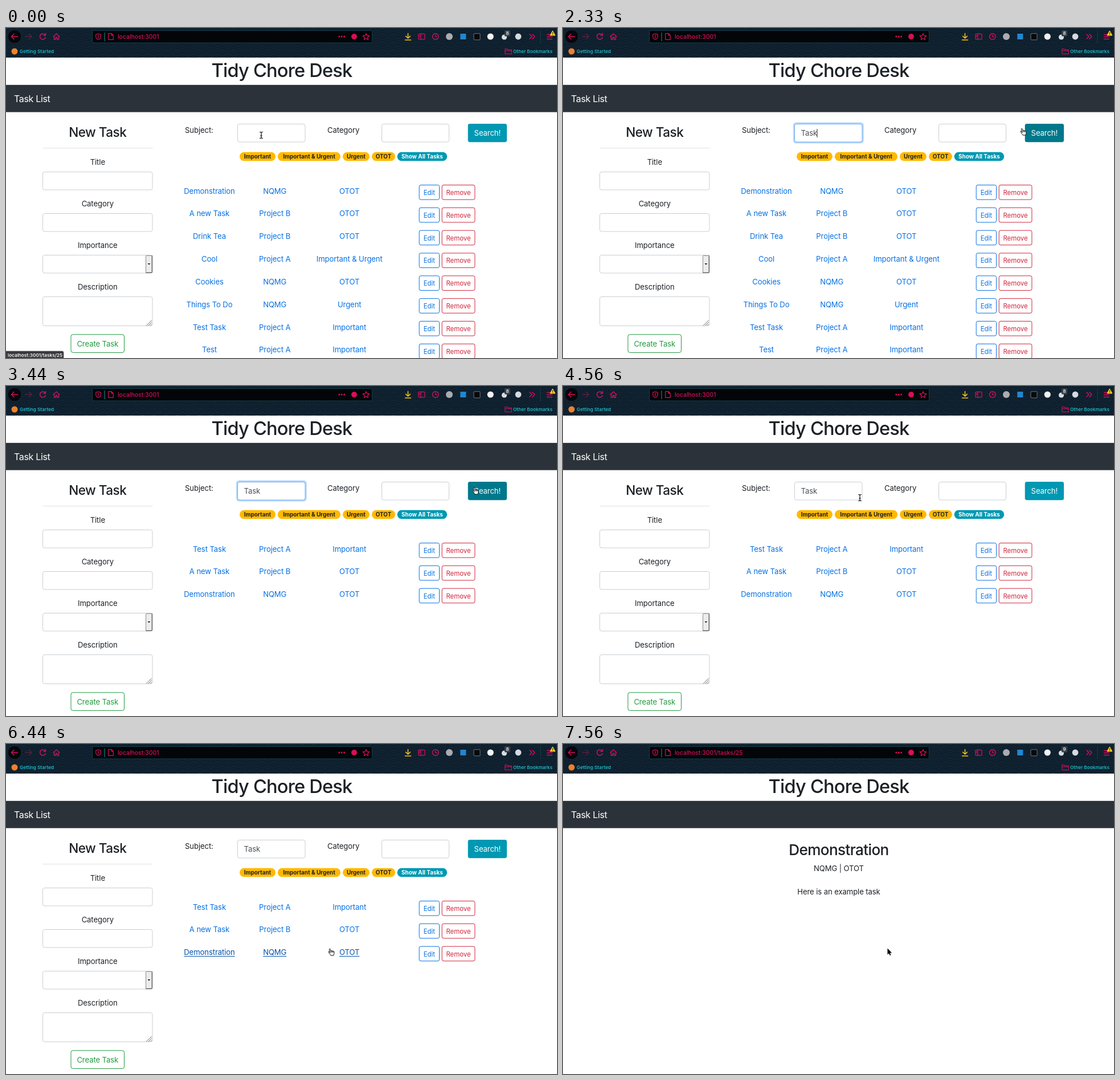
An HTML page with a canvas that plays this animation: 967 px wide and 579 px high, repeating every 8000 ms.

```html
<!DOCTYPE html>
<html lang="en">
<head>
<meta charset="utf-8">
<title>Task List</title>
<style>
html, body { margin: 0; width: 100%; height: 100%; overflow: hidden; background: #fff; }
canvas { display: block; width: 967px; height: 579px; }
</style>
</head>
<body>
<canvas id="stage"></canvas>
<script>
const W = 967, H = 579, LOOP = 8000;
const canvas = document.getElementById('stage');
const ctx = canvas.getContext('2d');
const dpr = window.devicePixelRatio || 1;
canvas.width = W * dpr;
canvas.height = H * dpr;

const INK = '#1d2126', LINK = '#0670e3', LINK_HOVER = '#0050a8', RED = '#d0263c',
  GREEN = '#1f9a3e', TEAL = '#0098b2', TEAL_HOVER = '#00788b', TEAL_PRESS = '#006f80',
  YELLOW = '#ffb900', PINK = '#d60f5c', CYAN = '#1fb5c2', BORDER = '#c9ced3';
const BODY = 13.1, TOOLBAR = 51.6;

const rows = [
  ['Demonstration', 'NQMG', 'OTOT'],
  ['A new Task', 'Project B', 'OTOT'],
  ['Drink Tea', 'Project B', 'OTOT'],
  ['Cool', 'Project A', 'Important & Urgent'],
  ['Cookies', 'NQMG', 'OTOT'],
  ['Things To Do', 'NQMG', 'Urgent'],
  ['Test Task', 'Project A', 'Important'],
  ['Test', 'Project A', 'Important']
];
const found = [rows[6], rows[1], rows[0]];

// Pointer steps: time, shape, x, y
const pointer = [
  [0, 'beam', 448, 188], [890, '', 0, 0], [1440, 'beam', 452, 188],
  [1560, 'beam', 496, 188], [1670, 'arrow', 572, 184], [1780, 'beam', 672, 188],
  [1890, 'beam', 739, 187], [2330, 'hand', 808, 182], [2780, 'hand', 824, 184],
  [4220, 'hand', 700, 222], [4330, 'hand', 578, 218], [4560, 'beam', 521, 196],
  [4780, 'beam', 505, 190], [4890, 'beam', 490, 184], [5000, 'beam', 483, 182],
  [5110, 'arrow', 486, 199], [5440, 'hand', 520, 228], [5560, 'arrow', 600, 255],
  [5670, 'arrow', 672, 306], [5780, 'arrow', 712, 342], [5890, 'hand', 743, 375],
  [6440, 'hand', 571, 365], [7000, 'arrow', 569.5, 358.5]
];
const typing = [[0, ''], [890, 'T'], [1000, 'Ta'], [1220, 'Tas'], [1330, 'Task']];

const within = (t, a, b) => t >= a && t < b;
const latest = (steps, t) => steps.filter(s => s[0] <= t).pop();

// y is the middle of the capitals
function text(s, x, y, size = BODY, color = INK, weight = 400, align = 'center') {
  ctx.font = `${weight} ${size}px Inter, "Open Sans", sans-serif`;
  ctx.letterSpacing = size > 16 ? `${-0.024 * size}px` : size > 12 ? `${-0.007 * size}px` : '0px';
  ctx.textAlign = align;
  ctx.fillStyle = color;
  ctx.fillText(s, x, y + size * 0.364);
  return ctx.measureText(s).width;
}

function rect(x, y, w, h, color) {
  ctx.fillStyle = color;
  ctx.fillRect(x, y, w, h);
}

function box(x, y, w, h, r, fill, stroke, lw = 1) {
  ctx.beginPath();
  ctx.roundRect(x, y, w, h, r);
  if (fill) { ctx.fillStyle = fill; ctx.fill(); }
  if (stroke) { ctx.strokeStyle = stroke; ctx.lineWidth = lw; ctx.stroke(); }
}

function disc(x, y, r, fill, stroke, lw = 1.3) {
  box(x - r, y - r, 2 * r, 2 * r, r, fill, stroke, lw);
}

function path(d, x, y, stroke, lw = 1.3, fill) {
  const p = new Path2D(d);
  ctx.save();
  ctx.translate(x, y);
  ctx.lineJoin = ctx.lineCap = 'round';
  if (fill) { ctx.fillStyle = fill; ctx.fill(p); }
  if (stroke) { ctx.strokeStyle = stroke; ctx.lineWidth = lw; ctx.stroke(p); }
  ctx.restore();
}

function waves() {
  ctx.save();
  ctx.beginPath();
  ctx.rect(0, 0, W, TOOLBAR);
  ctx.clip();
  rect(0, 0, W, H, '#0e1d2b');
  ctx.strokeStyle = '#19303f';
  ctx.lineWidth = 0.8;
  for (let j = 0; j < 10; j++) {
    for (let x = (j % 2) * 10 - 10; x < W + 20; x += 20) {
      ctx.fillStyle = '#0e1d2b';
      ctx.beginPath();
      ctx.arc(x, j * 7, 10, 0, 7);
      ctx.fill();
      for (const r of [9.5, 6, 2.5]) {
        ctx.beginPath();
        ctx.arc(x, j * 7, r, Math.PI, 2 * Math.PI);
        ctx.stroke();
      }
    }
  }
  ctx.restore();
}

function browser(detail) {
  waves();
  disc(15, 15, 12, '#06080c', '#24303b', 0.8);
  path('M5.5 0H-5.5M-1-4.5L-5.5 0L-1 4.5', 15, 15, PINK, 1.5);
  path('M-5.5 0H5.5M1-4.5L5.5 0L1 4.5', 39.5, 15, '#59203f', 1.4);
  path('M4.4-2.5A5 5 0 1 0 4.8 1.6M5-5.5V-2H1.5', 64.5, 15, PINK, 1.5);
  path('M-5.5 0L0-5L5.5 0M-4-1V5H-1.2V1.5H1.2V5H4V-1', 88.5, 15, PINK);

  box(151.5, 4.5, 491, 21.5, 2.5, '#040508', '#10414c');
  path('M0-5L4.3-3.6V0C4.3 2.5 2 4.4 0 5.2C-2 4.4-4.3 2.5-4.3 0V-3.6ZM0-2.6V2.6', 162, 15, PINK, 1.2);
  rect(172.5, 8, 1, 15, '#17919d');
  path('M-4.3-5.3H1.2L4.3-2.2V5.3H-4.3ZM1.2-5.3V-2.2H4.3', 184, 15, PINK, 1.2);
  text('localhost:3001' + (detail ? '/tasks/25' : ''), 196, 15.5, 10.4, PINK, 500, 'left');
  for (const x of [584.8, 589.2, 593.6]) disc(x, 15, 1.5, PINK);
  disc(611, 15, 5, PINK);
  path('M0-5.7L1.7-1.9L5.8-1.6L2.7 1.2L3.6 5.2L0 3L-3.6 5.2L-2.7 1.2L-5.8-1.6L-1.7-1.9Z', 632, 15.3, PINK, 1.2);

  path('M0-5.5V3M-3.8-.6L0 3L3.8-.6M-5 6H5', 705.5, 15, '#f5c211', 1.6);
  box(724, 10.3, 11, 9.6, 1.2, null, PINK, 1.3);
  path('M-1.5-4.8V4.8M-4-2H-3M-4 0H-3', 729.5, 15.1, PINK, 1.2);
  disc(753.8, 15, 5.3, null, PINK, 1.4);
  path('M0-3V0.3H2.5', 753.8, 15, PINK, 1.2);
  disc(778, 15, 6, '#a9acb0');
  box(797.3, 10, 10, 10, 0, '#2386cf');
  box(821, 9.8, 11, 11, 1, '#08090b', '#8b9196', 0.8);
  disc(850.2, 15, 5.6, '#f2f2f2');
  disc(874.5, 16, 4.6, '#d9dcde');
  box(875, 4, 10, 10.5, 1.5, '#3b4148');
  text(detail ? '9' : '8', 880, 9.4, 8, '#fff', 500);
  disc(899, 15, 5.4, '#d7dadd');
  path('M-4.5-4L-.5 0L-4.5 4M.5-4L4.5 0L.5 4', 923.5, 15, PINK, 1.5);
  rect(937.5, 4, 1, 22, '#15404b');
  path('M-4.5-4H4.5M-4.5 0H4.5M-4.5 4H4.5', 954, 15.5, PINK, 1.4);
  path('M0-4L4.3 3.8H-4.3Z', 959.5, 9.2, '#ffd21e', 1, '#ffd21e');
  rect(959, 7.3, 1.1, 3.2, '#222');
  rect(959, 11.3, 1.1, 1.1, '#222');

  disc(15, 41, 5.5, '#f0802b');
  text('Getting Started', 24, 41.3, 8.2, CYAN, 600, 'left');
  path('M-5.7-4.2H-1.7L-.6-2.8H5.7V4.5H-5.7ZM-5.7-1H5.7', 881.5, 41, PINK, 1.1);
  text('Other Bookmarks', 959, 41.3, 8.2, CYAN, 600, 'right');
}

function header() {
  text('Tidy Chore Desk', 484, 74.5, 32.6, INK, 500);
  rect(0, 99.8, W, 47.8, '#2c3239');
  text('Task List', 14, 124.5, 16.1, '#fff', 400, 'left');
}

function field(x, y, w, h = 31.5) {
  box(x, y, w, h, 3.4, '#fff', BORDER);
}

function form() {
  text('New Task', 160.7, 183, 22.6, INK, 500);
  rect(64.5, 210.3, 193, 1, '#e1e1e1');
  ['Title', 'Category', 'Importance', 'Description'].forEach((s, i) => {
    text(s, 160.8, 235.3 + i * 73);
    field(64.5, 252.5 + i * 73, 192.5, i === 3 ? 51 : 31.5);
  });
  box(245.5, 399.3, 10.8, 30, 1, '#ececec', '#8d8d8d');
  path('M10.8 0V30H0', 245.5, 399.3, '#4f4f4f', 1);
  path('M-2.4-1H2.4L0 1.6Z', 250.9, 414, null, 0, '#111');
  path('M0 9L9 0M3.5 9L9 3.5M7 9L9 7', 246.5, 513, '#555', 0.9);
  box(114, 537.8, 93.5, 31.6, 3.4, '#fff', GREEN);
  text('Create Task', 160.8, 554, BODY, GREEN);
}

function search(t) {
  const focus = within(t, 890, 3560);
  const caret = within(t, 1000, 1890) || within(t, 2330, 2780) || within(t, 3220, 3440);
  text('Subject:', 314, 179.3, BODY, INK, 400, 'left');
  if (focus) {
    box(403.8, 165.5, 124, 37, 5.5, '#b8d8fb');
    box(406.5, 168.5, 118.5, 31.5, 3.4, '#fff', '#6dabf2');
  } else field(406.5, 168.5, 118.5);
  const w = text(latest(typing, t)[1], 417.5, 184.5, BODY, '#495057', 400, 'left');
  if (caret) rect(Math.round(417.5 + w) - 0.5, 177, 1, 15, '#222');
  text('Category', 564, 179.3, BODY, INK, 400, 'left');
  field(659.5, 168.5, 118);
  const fill = within(t, 3000, 3220) ? TEAL_PRESS : within(t, 2330, 4220) ? TEAL_HOVER : TEAL;
  box(810.7, 168, 68.3, 32.2, 3.4, fill);
  text('Search!', 844.9, 184.5, BODY, '#fff');

  const badge = (s, x, w, fill = YELLOW, color = INK) => {
    box(x, 217.8, w, 15.4, 7.7, fill);
    text(s, x + w / 2, 225.8, 9.9, color, 700);
  };
  badge('Important', 410, 63);
  badge('Important & Urgent', 476.8, 110.3);
  badge('Urgent', 591, 47);
  badge('OTOT', 642, 41);
  badge('Show All Tasks', 686.6, 87.6, TEAL, '#fff');
}

function button(s, x, y, w, color, hover) {
  box(x + 0.5, y, w - 1, 25.6, 2.8, hover ? color : '#fff', color);
  text(s, x + w / 2, y + 13.2, 11.4, hover ? '#fff' : color);
}

function list(t) {
  (t < 3440 ? rows : found).forEach((row, i) => {
    const y = 285.8 + i * 39.83;
    const hover = i === 2 && t >= 6440;
    const color = hover ? LINK_HOVER : LINK;
    row.forEach((s, k) => {
      const x = [357, 471.7, 602.7][k];
      const w = text(s, x, y, BODY, color);
      if (hover) rect(x - w / 2, y + 6.5, w, 1, color);
    });
    button('Edit', 724.7, y - 10.3, 36.3, LINK, i === 2 && within(t, 5890, 6440));
    button('Remove', 764.7, y - 10.3, 58.7, RED);
  });
}

function details() {
  text('Demonstration', 484, 185.5, 26.1, INK, 500);
  text('NQMG | OTOT', 484, 218.3);
  text('Here is an example task', 484, 259.2);
}

function drawPointer(t) {
  const [, kind, x, y] = latest(pointer, t);
  if (kind === 'beam') {
    const d = 'M-2.5-5.5Q0-5.5 0-4Q0-5.5 2.5-5.5M0-4V4M-1.3 1H1.3M-2.5 5.5Q0 5.5 0 4Q0 5.5 2.5 5.5';
    path(d, x, y, '#fff', 2.4);
    path(d, x, y, '#111', 1.2);
  } else if (kind === 'arrow') {
    const d = 'M0 0V11L2.5 8.8L4.2 12.6L6 11.8L4.3 8.1H7.7Z';
    path(d, x, y, '#fff', 1.6);
    path(d, x, y, null, 0, '#000');
  } else if (kind === 'hand') {
    path('M-2.2 1.2L-3.6-4.2C-4-6-2.2-6.4-1.7-4.8L-.7-1.8C-.6-3 1-3 1.3-1.6C1.7-2.6 3-2.3 3.2-1.1' +
      'C3.8-1.9 5-1.4 5 0C5.2 2.5 4.5 3.2 4 6H-1C-1.6 4-3.7 2.8-5-.1C-5.4-1.2-4.2-1.6-3.3-.6Z' +
      'M-.7-1.8L-.2.4M1.3-1.6L1.6.4M3.2-1.1L3.3.5', x, y, '#111', 1, '#fff');
  }
}

function draw(t) {
  ctx.setTransform(dpr, 0, 0, dpr, 0, 0);
  rect(0, 0, W, H, '#fff');
  const detail = t >= 7000;
  browser(detail);
  header();
  if (!detail) {
    form();
    search(t);
    list(t);
  } else if (t >= 7220) details();
  if (t < 110) {
    box(-4, 567, 105, 16, 2.5, '#38383d', '#55555a', 0.7);
    text('localhost:3001/tasks/25', 3, 574, 8.2, '#f4f4f6', 600, 'left');
  }
  drawPointer(t);
}

const start = performance.now();
function frame() {
  draw((performance.now() - start) % LOOP);
  requestAnimationFrame(frame);
}
frame();
</script>
</body>
</html>
```
